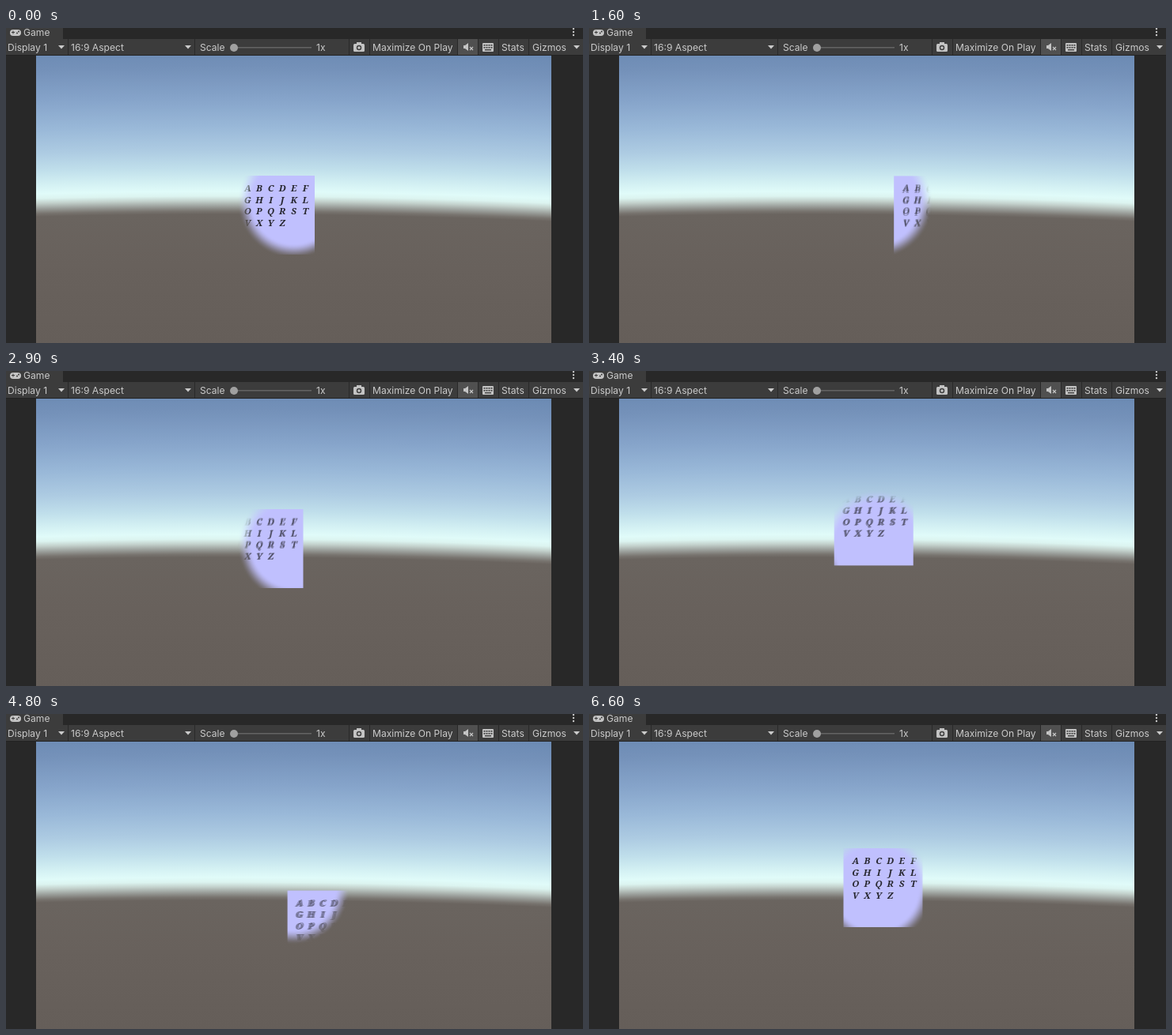
Write an HTML page with a canvas that moves like this. It is 729 px wide and 399 px high and loops after 6.7 s.

```html
<!DOCTYPE html>
<html lang="en">
<head>
<meta charset="utf-8">
<title>Game view</title>
<style>
  html, body { margin: 0; width: 100%; height: 100%; overflow: hidden; background: #282828; }
  canvas { display: block; width: 729px; height: 399px; }
</style>
</head>
<body>
<canvas id="stage" width="729" height="399"></canvas>
<script>
const W = 729, H = 399, LOOP = 6700, STEP = 100;
const VIEW = { x: 38, y: 35, w: 651, h: 364 };
const SPOT = { x: 363.5, y: 221, inner: 52, outer: 71 };
const CARD = 100;
const ROWS = ["ABCDEF", "GHIJKL", "OPQRST", "VXYZ"];

// Dragged card: time, left, top
const PATH = [
  [0, 290, 187], [350, 279, 185.5], [700, 286, 184], [1000, 311, 147],
  [1400, 374, 160], [1700, 380, 200], [2100, 302, 221.5], [2500, 276, 203],
  [2900, 275.5, 175], [3500, 318, 143], [4000, 366, 146], [4250, 388, 168],
  [4600, 382, 212], [4900, 344, 223], [5200, 338, 190], [5500, 322, 144],
  [5600, 328, 161], [5900, 327, 167], [6300, 321.5, 170]
];

const ctx = document.getElementById("stage").getContext("2d");

function layer(w, h) {
  const c = document.createElement("canvas");
  c.width = w;
  c.height = h;
  return c.getContext("2d");
}

function rect(g, color, x, y, w, h) {
  g.fillStyle = color;
  g.fillRect(x, y, w, h);
}

function roundRect(g, color, x, y, w, h, r) {
  g.fillStyle = color;
  g.beginPath();
  g.roundRect(x, y, w, h, r);
  g.fill();
}

function disc(g, color, x, y, r) {
  g.fillStyle = color;
  g.beginPath();
  g.arc(x, y, r, 0, Math.PI * 2);
  g.fill();
}

function poly(g, color, pts) {
  g.fillStyle = color;
  g.beginPath();
  pts.forEach(([x, y]) => g.lineTo(x, y));
  g.fill();
}

function drawScene(g) {
  const sky = g.createLinearGradient(0, 25, 0, 399);
  const stops = [
    [25, "#6b8ab3"], [50, "#7491b9"], [90, "#86a4ca"], [125, "#99b8d8"],
    [155, "#adcbe2"], [178, "#c0dfeb"], [195, "#d3f0f3"], [207, "#e0fbf9"],
    [213, "#dcf4f0"], [219, "#c3d1cc"], [226, "#9a9e9a"], [232, "#78746f"],
    [236, "#6a645f"], [300, "#68615c"], [399, "#655e59"]
  ];
  stops.forEach(([y, c]) => sky.addColorStop((y - 25) / 374, c));
  // The horizon bends down towards both sides
  for (let x = VIEW.x; x < VIEW.x + VIEW.w; x++) {
    const drop = 5.3e-5 * (x - 275) ** 2;
    g.save();
    g.beginPath();
    g.rect(x, VIEW.y, 1, VIEW.h);
    g.clip();
    g.translate(0, drop);
    rect(g, sky, x, 0, 1, H);
    g.restore();
  }
}

function drawIcons(g) {
  const ink = "#c4c4c4", bar = "#3c3c3c";
  // gamepad
  roundRect(g, ink, 5, 2, 14, 8, 4);
  rect(g, bar, 7, 5, 4, 1);
  rect(g, bar, 8.5, 3.5, 1, 4);
  disc(g, bar, 14, 6.5, 1);
  disc(g, bar, 16, 4.5, 1);
  // menu dots
  [1, 5, 9].forEach(y => disc(g, ink, 717, y, 1.2));
  // camera
  roundRect(g, ink, 439, 20, 14, 10, 1.5);
  rect(g, ink, 443, 18, 6, 3);
  disc(g, bar, 446, 25, 3.2);
  disc(g, ink, 446, 25, 1.8);
  // muted speaker
  poly(g, ink, [[578, 22], [580, 22], [584, 19], [584, 29], [580, 26], [578, 26]]);
  g.strokeStyle = ink;
  g.lineWidth = 1.2;
  g.beginPath();
  g.moveTo(586, 24);
  g.lineTo(590, 28);
  g.moveTo(590, 24);
  g.lineTo(586, 28);
  g.stroke();
  // keyboard
  roundRect(g, ink, 602, 19, 14, 11, 1);
  for (let row = 0; row < 2; row++)
    for (let i = 0; i < 4; i++) rect(g, bar, 603.5 + i * 3, 21 + row * 3, 2, 1.6);
  rect(g, bar, 605, 27, 8, 1.4);
}

function drawBars(g) {
  const bar = "#3c3c3c", ink = "#cbcbcb";
  rect(g, "#282828", 0, 0, W, 14);
  rect(g, bar, 0, 0, 72, 14);
  rect(g, bar, 0, 14, W, 21);
  rect(g, "#505050", 571, 14, 25, 21);
  rect(g, "#232323", 0, 34, W, 1);
  [78, 238, 433, 459, 570, 596, 622, 660].forEach(x => rect(g, "#292929", x, 14, 1, 20));
  [70, 230, 721].forEach(x => poly(g, ink, [[x - 4, 22], [x + 4, 22], [x, 26.5]]));
  rect(g, "#646464", 288, 24, 98, 1.5);
  disc(g, "#a0a0a0", 288, 25, 5);

  g.font = "12.1px Inter, Roboto, sans-serif";
  g.fillStyle = ink;
  const labels = [
    ["Game", 22, 10], ["Display 1", 2, 29], ["16:9 Aspect", 82, 29], ["Scale", 245, 29],
    ["1x", 392, 29], ["Maximize On Play", 463, 29], ["Stats", 626, 29], ["Gizmos", 665, 29]
  ];
  labels.forEach(([s, x, y]) => g.fillText(s, x, y));
  drawIcons(g);
}

function drawLetters(g, x, y, alpha) {
  g.fillStyle = `rgba(32,32,38,${alpha})`;
  ROWS.forEach((row, r) => [...row].forEach((ch, c) =>
    g.fillText(ch, x + 15.3 + c * 14.6, y + 20 + r * 14.5)));
}

// Smooth curve through the path points, at rest at both ends
function cardAt(time) {
  const last = PATH.length - 1;
  const t = Math.min(Math.max(time, 0), PATH[last][0]);
  let i = 0;
  while (i < last - 1 && PATH[i + 1][0] <= t) i++;
  const a = PATH[i], b = PATH[i + 1], span = b[0] - a[0], u = (t - a[0]) / span;
  const slope = (n, k) => n === 0 || n === last ? 0 :
    (PATH[n + 1][k] - PATH[n - 1][k]) / (PATH[n + 1][0] - PATH[n - 1][0]);
  return [1, 2].map(k =>
    a[k] * (1 + 2 * u) * (1 - u) ** 2 + b[k] * u * u * (3 - 2 * u) +
    span * (slope(i, k) * u * (1 - u) ** 2 - slope(i + 1, k) * u * u * (1 - u)));
}

const still = layer(W, H);
rect(still, "#282828", 0, 0, W, H);
drawScene(still);
drawBars(still);

const card = layer(W, H);
card.font = "italic bold 11.5px 'Noto Serif', 'DejaVu Serif', serif";
card.textAlign = "center";
const mask = card.createRadialGradient(SPOT.x, SPOT.y, SPOT.inner, SPOT.x, SPOT.y, SPOT.outer);
for (let i = 0; i <= 10; i++) {
  const u = i / 10;
  mask.addColorStop(u, `rgba(0,0,0,${1 - u * u * (3 - 2 * u)})`);
}

function drawCard(t) {
  const [x, y] = cardAt(t);
  const [px, py] = cardAt(t - 30), [nx, ny] = cardAt(t + 30);
  const vx = (nx - px) / 60 * STEP, vy = (ny - py) / 60 * STEP;
  const speed = Math.hypot(vx, vy);
  const smear = Math.min(speed * 0.2, 2.6);

  card.globalCompositeOperation = "source-over";
  card.clearRect(0, 0, W, H);
  rect(card, "#c0c0fe", x, y, CARD, CARD);
  if (smear < 0.8) {
    drawLetters(card, x, y, 0.95);
  } else {
    for (let i = -1; i <= 1; i++) {
      const d = i * smear / 2 / speed;
      drawLetters(card, x + vx * d, y + vy * d, 0.33);
    }
  }
  card.globalCompositeOperation = "destination-in";
  rect(card, mask, 0, 0, W, H);
}

function frame(now) {
  const t = Math.floor((now - start) % LOOP / STEP) * STEP;
  drawCard(Math.max(t, 0));
  ctx.drawImage(still.canvas, 0, 0);
  ctx.drawImage(card.canvas, 0, 0);
  requestAnimationFrame(frame);
}

const start = performance.now();
frame(start);
</script>
</body>
</html>
```
